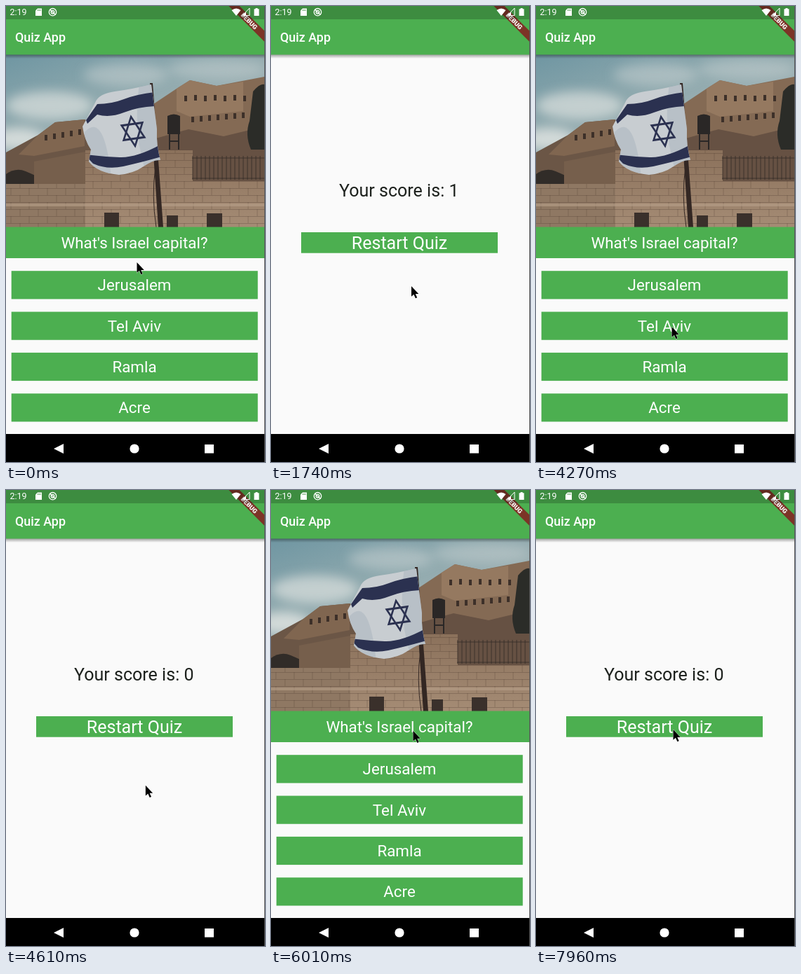
An HTML page that plays this animation: 369 by 651 pixels, repeating every 8 s.

```html
<!DOCTYPE html>
<html lang="en">
<head>
<meta charset="utf-8">
<title>Quiz App</title>
<style>
  html, body { margin: 0; width: 100%; height: 100%; overflow: hidden; background: #fafafa; }
  svg { display: block; width: 100vw; height: 100vh; }
  text { font-family: Roboto, sans-serif; fill: #fff; }
  .mid { text-anchor: middle; }
  .ask { font-size: 22.4px; }
  .big { font-size: 25.06px; }
</style>
</head>
<body>
<svg viewBox="0 0 369 651" preserveAspectRatio="none">
  <defs>
    <linearGradient id="sky" x1="0" y1="0" x2=".5" y2="1">
      <stop offset="0" stop-color="#6f96a2"/><stop offset=".35" stop-color="#8fa9ae"/>
      <stop offset=".7" stop-color="#a9b7b8"/>
    </linearGradient>
    <linearGradient id="wall" x1="0" y1="0" x2="0" y2="1">
      <stop offset="0" stop-color="#8b715b"/><stop offset="1" stop-color="#a58c75"/>
    </linearGradient>
    <linearGradient id="shade" x1="0" y1="0" x2="0" y2="1">
      <stop offset="0" stop-color="#000" stop-opacity=".38"/><stop offset="1" stop-color="#000" stop-opacity="0"/>
    </linearGradient>
    <pattern id="brick" width="26" height="20" patternUnits="userSpaceOnUse">
      <path d="M0 .5H26M0 10.5H26M7 0V10M20 10V20" stroke="#4d3a2d" stroke-opacity=".3" fill="none"/>
    </pattern>
    <filter id="soft" x="-30%" y="-30%" width="160%" height="160%"><feGaussianBlur stdDeviation="8"/></filter>
    <clipPath id="frame"><rect y="69" width="368" height="247"/></clipPath>
    <clipPath id="cloth"><path d="M207 112Q178 119 155 122T127 138L109 172Q112 192 121 205L118 222Q130 238 161 241 182 239 196 229T220 220Q214 200 215 176Z"/></clipPath>
    <clipPath id="screen"><rect width="368" height="651"/></clipPath>
  </defs>

  <rect width="369" height="651" fill="#fafafa"/>

  <g id="quiz">
    <g clip-path="url(#frame)">
      <rect y="69" width="368" height="247" fill="url(#sky)"/>
      <g fill="#d3dad9" filter="url(#soft)">
        <ellipse cx="62" cy="142" rx="62" ry="20" opacity=".8"/>
        <ellipse cx="18" cy="190" rx="38" ry="16"/>
        <ellipse cx="170" cy="98" rx="60" ry="16" opacity=".45"/>
        <ellipse cx="300" cy="90" rx="70" ry="14" opacity=".4"/>
      </g>
      <path d="M0 209L46 184 70 166 112 162 135 172V316H0Z" fill="#6b5646"/>
      <path d="M46 184L70 166 112 162V200L40 214 18 212Z" fill="#806650"/>
      <path d="M210 140L243 118 262 106 300 114 368 101V240H210Z" fill="#846a54"/>
      <path d="M243 118L262 106 300 114 338 108V150L262 158 243 150Z" fill="#957960"/>
      <path d="M210 190L260 176 310 186 368 172V250H210Z" fill="#665143"/>
      <g id="panes" fill="#3d3029"></g>
      <path d="M352 122Q362 110 368 112V205H349Q340 184 347 164Z" fill="#2b2c28"/>
      <path d="M0 240Q14 230 28 236T50 246V262H0Z" fill="#312c28"/>
      <path d="M40 222L113 208V262H40Z" fill="#765f4c"/>
      <path d="M113 206H266V250H368V316H113Z" fill="url(#wall)"/>
      <path d="M0 254H113V316H0Z" fill="#8f7863"/>
      <path d="M0 254H113V206H266V250H368V316H0Z" fill="url(#brick)"/>
      <path d="M0 282H368V286H0Z" fill="#b8a18a" opacity=".6"/>
      <path d="M140 295h21v21h-21zM286 296h22v20h-22zM229 299h16v17h-16z" fill="#3a302b"/>
      <path id="fence" fill="none" stroke="#332b27" stroke-width=".8"/>
      <path d="M230 157q9-5 18 0v26h-18zM232 183h2v22h-2zM245 183h2v22h-2zM232 192h14v2h-14z" fill="#2a2726"/>
      <path d="M205 110L209 110 224 316H217L211 226Z" fill="#332723"/>
      <path d="M213 230Q207 270 214 316" fill="none" stroke="#332723"/>
      <g clip-path="url(#cloth)">
        <rect x="100" y="105" width="125" height="140" fill="#c8cdd1"/>
        <path d="M112 180Q140 150 150 245L108 240ZM190 110Q180 180 200 240L222 230 208 110Z" fill="#aab3bd" opacity=".5"/>
        <path d="M114 163L130 140Q150 140 168 133T212 123V143Q188 144 168 152T130 155L116 168Z" fill="#2b3150"/>
        <path d="M112 212Q138 215 162 216T222 197V215Q190 224 167 229T124 225Z" fill="#2b3150"/>
      </g>
      <g transform="translate(181 179) rotate(-8) scale(.83 1)" fill="none" stroke="#2b3150" stroke-width="3">
        <path d="M0-21L18 10.5H-18Z"/><path d="M0 21L18-10.5H-18Z"/>
      </g>
    </g>
    <rect y="315.5" width="368" height="44.5" fill="#4caf50"/>
    <text class="mid ask" x="183" y="346">What's Israel capital?</text>
    <g id="answers"></g>
  </g>

  <g id="result">
    <text class="big" id="score" x="97" y="272" style="fill:#1d211d"></text>
    <rect x="43" y="323" width="280" height="29.7" fill="#4caf50"/>
    <text class="mid big" x="183" y="347">Restart Quiz</text>
  </g>

  <g clip-path="url(#screen)">
    <rect y="69" width="368" height="6" fill="url(#shade)"/>
    <rect width="368" height="69.5" fill="#4caf50"/>
    <text x="13" y="51" font-size="17.9" font-weight="500">Quiz App</text>
    <g transform="translate(368 0) rotate(45)">
      <rect x="-36" y="25" width="72" height="10.8" fill="#7c3427"/>
      <text class="mid" y="33.7" font-size="9.1" font-weight="900">DEBUG</text>
    </g>
    <rect width="368" height="19" opacity=".2"/>
    <text x="5.5" y="13.3" font-size="12.5">2:19</text>
    <g fill="#fff">
      <path d="M45 3.5h6v10.5h-9V6.5z"/>
      <path d="M45.5 5v2M47.3 5v2M49.1 5v2" stroke="#3d8c40" stroke-width=".8"/>
      <path d="M321.5 6Q328 1 334.5 6L328 14Z"/>
      <path d="M347 3V13.5H337Z" fill="none" stroke="#fff"/>
      <path d="M342 8.5V13.5H337Z"/>
      <path d="M355.5 3h3v1.3h2V14h-7V4.3h2z"/>
    </g>
    <g fill="none" stroke="#fff" stroke-width="1.3">
      <circle cx="66.5" cy="8.7" r="5.2"/><circle cx="66.5" cy="8.7" r="2.3"/><path d="M62.5 5L70.5 12.5"/>
    </g>
    <rect y="611" width="368" height="40"/>
    <path d="M82 625v14l-14-7zM283 626h13v12.5h-13z" fill="#fff"/>
    <circle cx="183" cy="632" r="6.6" fill="#fff"/>
  </g>
  <rect x="368" width="1" height="651" fill="#555"/>

  <g id="mouse">
    <g id="press" fill="none">
      <circle r="11" stroke="#000"/><circle r="10" stroke="#fff"/>
    </g>
    <path d="M0 0V14.8L3.4 11.7 5.9 17.3 8.2 16.3 5.8 10.9H10.3Z" stroke="#fff" stroke-width=".8" paint-order="stroke"/>
  </g>
</svg>
<script>
const $ = id => document.getElementById(id);
const LOOP = 8000;

// time, x, y, sideways bend on the way there
const PATH = [
  [0, 186.5, 366], [460, 186.5, 366], [660, 198, 399], [1330, 199, 399], [1490, 200, 400],
  [2040, 200, 400], [2350, 198.5, 332], [2650, 198.5, 332], [2900, 195, 334], [3230, 195, 334],
  [4000, 193.5, 458, 6], [4480, 193.5, 458], [5240, 202.5, 343, 3], [6010, 202.5, 343],
  [6440, 193, 520], [6640, 193, 520], [6760, 192, 512], [7230, 192, 512], [7960, 195.5, 342, 4], [LOOP, 195.5, 342]
];
const CLICKS = [[1330, 1490], [2950, 3070], [4110, 4270], [5410, 5520], [6800, 6980]];
const RESULTS = [[1740, 3320, 1], [4480, 5820, 0], [7230, LOOP, 0]];

$('answers').innerHTML = ['Jerusalem', 'Tel Aviv', 'Ramla', 'Acre'].map((name, i) => {
  const y = 378.2 + i * 58.35;
  return `<rect x="7.7" y="${y}" width="351" height="40.2" fill="#4caf50"/>
    <text class="mid ask" x="183" y="${y + 28}">${name}</text>`;
}).join('');

const pane = (x, y) => `<rect x="${x}" y="${y}" width="4" height="8"/>`;
let panes = '';
for (let i = 0; i < 7; i++) panes += pane(254 + i * 14, 128 - i % 2) + pane(264 + i * 12, 158 - i);
for (let i = 0; i < 5; i++) panes += pane(55 + i * 12, 184 - i * 2);
$('panes').innerHTML = panes;

let rails = 'M265 217H368M265 246H368';
for (let x = 266; x < 368; x += 6) rails += `M${x} 214V248`;
$('fence').setAttribute('d', rails);

const within = t => ([from, to]) => t >= from && t < to;
const show = (id, on) => $(id).setAttribute('display', on ? 'inline' : 'none');

function pointer(t) {
  const i = PATH.findIndex(p => p[0] > t);
  const [t0, x0, y0] = PATH[i - 1], [t1, x1, y1, bend = 0] = PATH[i];
  const u = (t - t0) / (t1 - t0), k = 1 - (1 - u) ** 2;
  return [x0 + (x1 - x0) * k + bend * Math.sin(Math.PI * k), y0 + (y1 - y0) * k];
}

function draw(t) {
  const result = RESULTS.find(within(t));
  show('quiz', !result);
  show('result', result);
  if (result) $('score').textContent = `Your score is: ${result[2]}`;
  show('press', CLICKS.some(within(t)));
  $('mouse').setAttribute('transform', `translate(${pointer(t)})`);
}

const start = performance.now();
function tick() {
  draw((performance.now() - start) % LOOP);
  requestAnimationFrame(tick);
}
tick();
</script>
</body>
</html>
```
